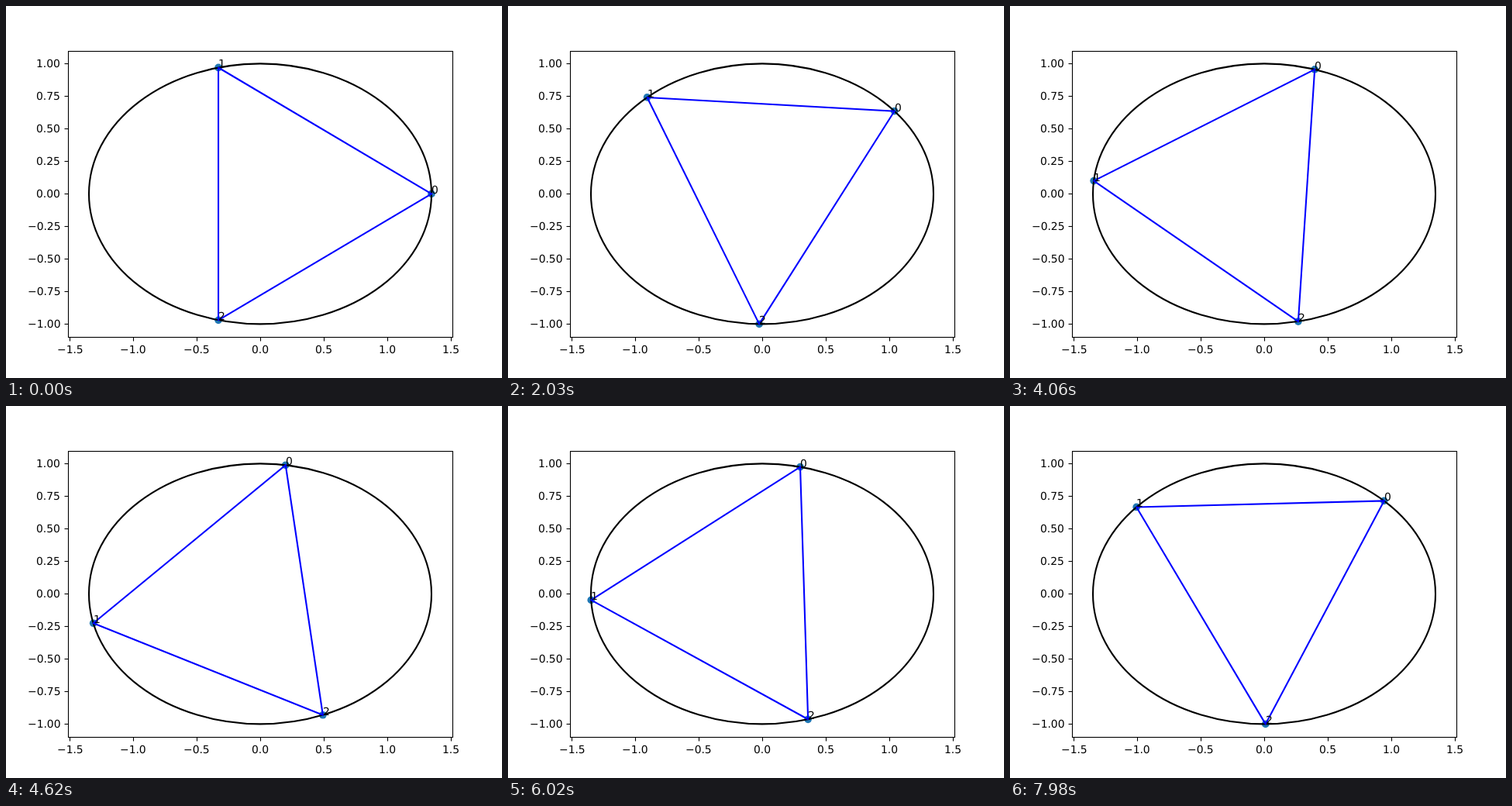
Animation of 640 by 480 pixels, one loop 8 s. Source, as an HTML page with a canvas:

```html
<!DOCTYPE html>
<html lang="en">
<head>
<meta charset="utf-8">
<title>Equilateral triangle in an ellipse</title>
<style>
  html, body { margin: 0; width: 100%; height: 100%; overflow: hidden; background: #fff; }
  canvas { display: block; width: 640px; height: 480px; }
</style>
</head>
<body>
<canvas id="stage" width="640" height="480"></canvas>
<script>
const ctx = document.getElementById("stage").getContext("2d");

const LOOP = 8000, STEP = 70, TURN = 74;   // the corner turns back at the top after TURN steps
const A = 1.35, B = 1;                     // ellipse half axes
const PT = 100 / 72;                       // pixels per point
const LEFT = 80, RIGHT = 576, TOP = 58, BOTTOM = 427;
const px = x => 328 + 163.7 * x;
const py = y => 242.4 - 168 * y;

// Arc length of the ellipse from (A, 0) to parameter t, by Simpson's rule.
function arcLength(t) {
  const n = 24, h = t / n;
  let sum = 0;
  for (let i = 0; i <= n; i++) {
    const weight = i === 0 || i === n ? 1 : i % 2 ? 4 : 2;
    sum += weight * Math.hypot(A * Math.sin(i * h), B * Math.cos(i * h));
  }
  return sum * h / 3;
}
const QUARTER = arcLength(Math.PI / 2);

// The only inscribed equilateral triangle whose first corner points along theta.
function triangle(theta) {
  const k = (1 / B ** 2 - 1 / A ** 2) / 4;
  const cx = k * A * A * Math.cos(3 * theta);
  const cy = k * B * B * Math.sin(3 * theta);
  const r = 1 / Math.sqrt((1 / A ** 2 + 1 / B ** 2) / 2 + (cx / A) ** 2 + (cy / B) ** 2);
  return [0, 1, 2].map(i => {
    const angle = theta + i * 2 * Math.PI / 3;
    return [r * (cx + Math.cos(angle)), r * (cy + Math.sin(angle))];
  });
}

// Triangle whose first corner lies at the given distance along the ellipse.
function triangleAt(distance) {
  let low = 0, high = Math.PI / 2;
  for (let i = 0; i < 32; i++) {
    const mid = (low + high) / 2;
    const [x, y] = triangle(mid)[0];
    if (arcLength(Math.atan2(y / B, x / A)) < distance) low = mid;
    else high = mid;
  }
  return triangle((low + high) / 2);
}

function stroke(color, width, points) {
  ctx.strokeStyle = color;
  ctx.lineWidth = width * PT;
  ctx.beginPath();
  points.forEach(([x, y]) => ctx.lineTo(x, y));
  ctx.stroke();
}

// align: 0 = left, 0.5 = centre, 1 = right
function label(text, x, y, align = 0) {
  ctx.fillText(text, Math.round(x - align * ctx.measureText(text).width), Math.round(y));
}

const number = (v, digits) => (v < 0 ? "\u2212" : "") + Math.abs(v).toFixed(digits);

function drawAxes() {
  ctx.lineCap = "butt";
  for (let v = -1.5; v <= 1.5; v += 0.5) {
    const x = Math.round(px(v)) + 0.5;
    stroke("#000", 0.8, [[x, BOTTOM + 0.5], [x, BOTTOM + 5.5]]);
    label(number(v, 1), px(v), 448, 0.5);
  }
  for (let v = -1; v <= 1; v += 0.25) {
    const y = Math.round(py(v));
    stroke("#000", 0.8, [[LEFT - 4.5, y + 0.5], [LEFT + 0.5, y + 0.5]]);
    label(number(v, 2), LEFT - 7 * PT, y + 5, 1);
  }
  ctx.lineWidth = 0.8 * PT;
  ctx.strokeRect(LEFT + 0.5, TOP + 0.5, RIGHT - LEFT, BOTTOM - TOP);
}

function draw(time) {
  const step = Math.floor(time % LOOP / STEP);
  const corners = triangleAt(QUARTER * (1 - Math.abs(step - TURN) / TURN))
    .map(([x, y]) => [px(x), py(y)]);

  ctx.fillStyle = "#fff";
  ctx.fillRect(0, 0, 640, 480);

  ctx.fillStyle = "#1f77b4";
  for (const [x, y] of corners) {
    ctx.beginPath();
    ctx.arc(x, y, 3.5 * PT, 0, 2 * Math.PI);
    ctx.fill();
  }

  ctx.strokeStyle = "#000";
  ctx.lineWidth = 1.5 * PT;
  ctx.beginPath();
  ctx.ellipse(px(0), py(0), px(A) - px(0), py(0) - py(B), 0, 0, 2 * Math.PI);
  ctx.stroke();

  ctx.lineJoin = "round";
  ctx.lineCap = "square";
  stroke("#00f", 1.5, [...corners, corners[0]]);

  ctx.lineJoin = "miter";
  ctx.fillStyle = "#000";
  ctx.font = `${10 * PT}px "DejaVu Sans", sans-serif`;
  ctx.textRendering = "geometricPrecision";
  drawAxes();
  corners.forEach(([x, y], i) => label(String(i), x, y));
}

const start = performance.now();
function tick() {
  draw(performance.now() - start);
  requestAnimationFrame(tick);
}
tick();
</script>
</body>
</html>
```
